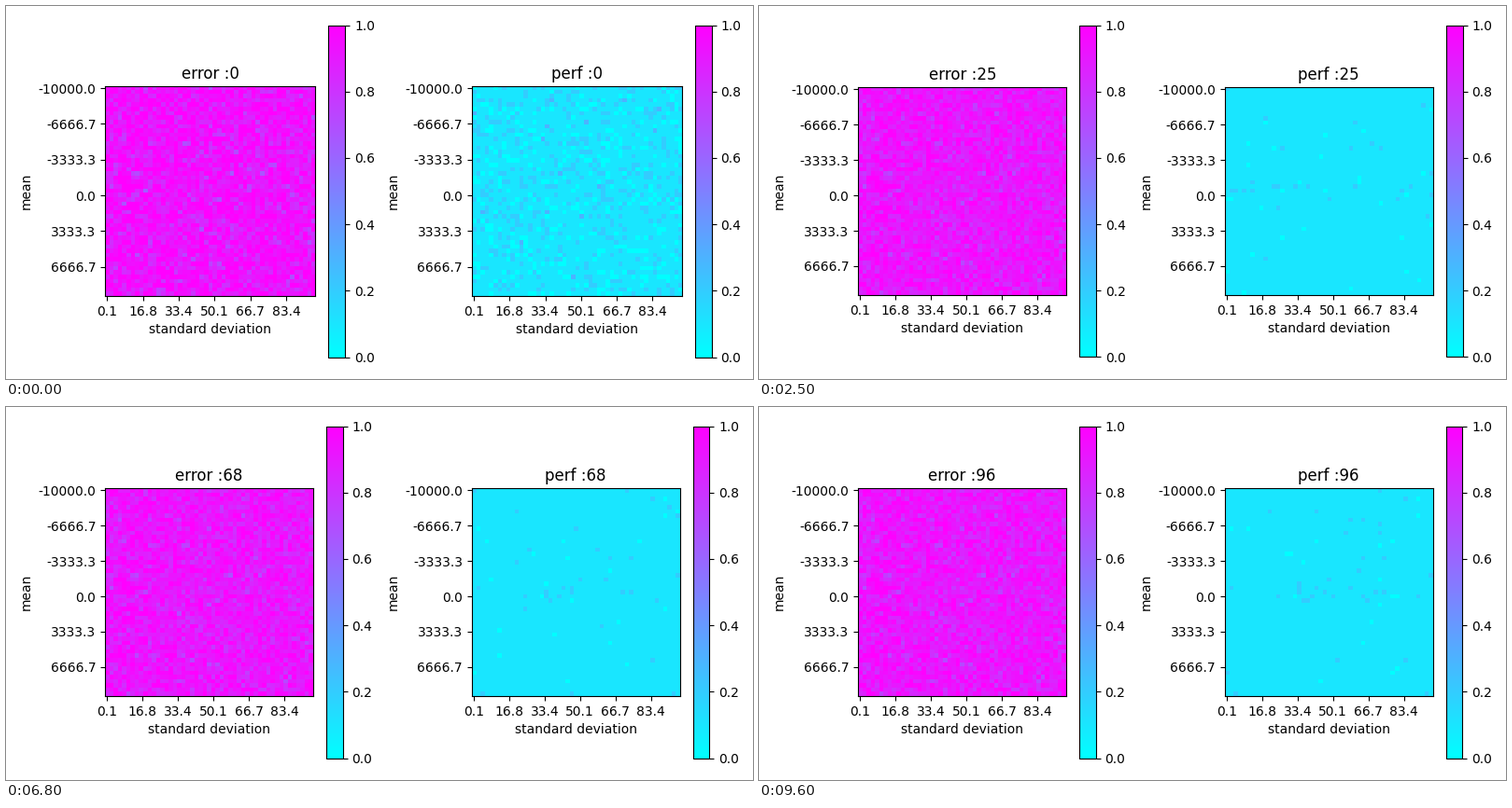
A matplotlib script that plays this animation: 800x400 px, repeating every 9.7 s.

```python
import numpy as np
import matplotlib.pyplot as plt
from matplotlib.animation import FuncAnimation

FRAMES, INTERVAL = 97, 100
N = 49       # cells per side
STEPS = 6    # labelled ticks per axis

plt.rcParams["font.family"] = "DejaVu Sans"
rng = np.random.default_rng(11)

error_noise = rng.normal(size=(N, N))
error_start = rng.normal(size=(N, N))
perf_start = rng.random((N, N))


def make_specks(count, spread):
    """Cells scattered around the middle row, each with a lifetime."""
    cols = rng.integers(0, N, count)
    rows = np.clip(rng.normal(N / 2, spread, count), 0, N - 1).astype(int)
    born = rng.integers(-60, FRAMES, count)
    return rows, cols, born, born + rng.integers(30, 90, count)


low_specks = make_specks(75, 14)
high_specks = make_specks(45, 15)
band_specks = make_specks(45, 1.5)


def paint_specks(grid, specks, value, i):
    rows, cols, born, gone = specks
    alive = (born <= i) & (i < gone)
    grid[rows[alive], cols[alive]] = value


def error_at(i):
    fade = np.exp(-i / 3)
    noise = 0.07 * error_noise + 0.05 * fade * error_start
    return np.clip(0.91 + 0.02 * fade + noise, 0, 1)


def perf_at(i):
    grid = np.full((N, N), 0.1)
    paint_specks(grid, low_specks, 0.0, i)
    paint_specks(grid, high_specks, 0.2, i)
    paint_specks(grid, band_specks, 0.2, i)
    # early scatter that quickly settles to the common level
    fade = np.exp(-i / 2.2)
    grid[perf_start < 0.12 * fade] = 0.0
    grid[perf_start > 1 - 0.16 * fade] = 0.2
    grid[perf_start > 1 - 0.008 * fade] = 0.3
    return grid


def tick_labels(start, end):
    values = np.linspace(start, end, STEPS + 1)[:-1]
    return [f"{v + 1e-9:.1f}" for v in values]


def add_panel(ax, data):
    image = ax.imshow(data, cmap="cool", vmin=0, vmax=1,
                      interpolation="nearest")
    ticks = np.arange(STEPS) * 50 / STEPS
    ax.set_xticks(ticks, tick_labels(0.1, 100))
    ax.set_yticks(ticks, tick_labels(-10000, 10000))
    ax.set_xlabel("standard deviation")
    ax.set_ylabel("mean")
    fig.colorbar(image, ax=ax)
    return image, ax.set_title("error :0")


def next_layout():
    fig.tight_layout()
    pars = fig.subplotpars
    return {"left": pars.left, "right": pars.right, "bottom": pars.bottom,
            "top": pars.top, "wspace": pars.wspace}


fig, (error_ax, perf_ax) = plt.subplots(1, 2, figsize=(8, 4), dpi=100,
                                        facecolor="white")
error_image, error_title = add_panel(error_ax, error_at(0))
perf_image, perf_title = add_panel(perf_ax, perf_at(0))

# repeated tight layouts alternate slightly after the first pass
layouts = [next_layout() for _ in range(3)]


def update(i):
    fig.subplots_adjust(**layouts[0 if i == 0 else 2 - i % 2])
    error_image.set_data(error_at(i))
    perf_image.set_data(perf_at(i))
    error_title.set_text(f"error :{i}")
    perf_title.set_text(f"perf :{i}")
    return error_image, perf_image, error_title, perf_title


anim = FuncAnimation(fig, update, frames=FRAMES, interval=INTERVAL,
                     init_func=lambda: update(0), repeat=True,
                     repeat_delay=0, blit=False)
plt.show()
```
